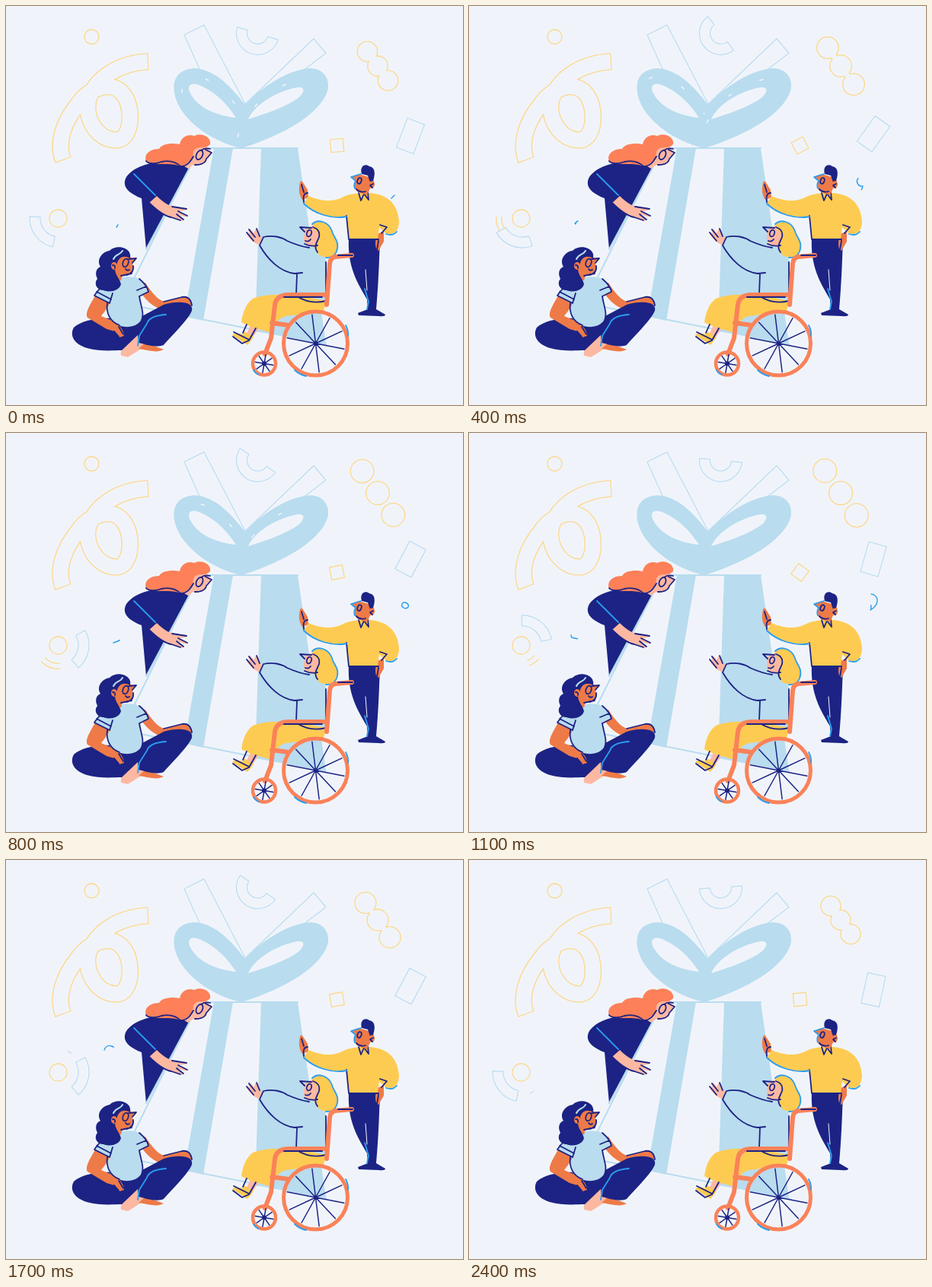
An HTML page that plays this animation: 600x525 px, repeating every 2.5 s.

```html
<!DOCTYPE html>
<html lang="en">
<head>
<meta charset="utf-8">
<title>Gift and friends</title>
<style>
html, body { margin: 0; width: 100%; height: 100%; overflow: hidden; background: #f0f4fa }
svg { display: block; width: 600px; height: 525px }
svg * { stroke-linecap: round; stroke-linejoin: round }
.sky { fill: #b9dcef }
.navy { fill: #1c2384 }
.sun { fill: #fecb52 }
.tan { fill: #ee7a48 }
.pink { fill: #fdb8a2 }
.hair { fill: #fd8058 }
.paper { fill: #f0f4fa }
.ink { fill: none; stroke: #1c2384; stroke-width: 1.8 }
.glow { fill: none; stroke: #2a9df0; stroke-width: 1.8 }
.chair { fill: none; stroke: #fa8259; stroke-width: 6 }
.edgeSky { fill: none; stroke: #b9dcef; stroke-width: 2 }
.thinSky { fill: none; stroke: #bcdcf2; stroke-width: 1.2 }
.thinSun { fill: none; stroke: #fdd78c; stroke-width: 1.3 }
.edge { fill: none; stroke: #fdd78c }
.core { fill: none; stroke: #f0f4fa }
.worm { fill: none; stroke: #2a9df0; stroke-width: 1.4 }
#sparks { fill: none; stroke: #f4f9fd; stroke-width: 1.4 }
#curl path { stroke-linecap: butt }
</style>
</head>
<body>
<svg viewBox="0 0 600 525">
  <!-- ribbon tails, box and bow -->
  <path class="thinSky" d="M255 85L234 38 260 25 314 129 404 43 420 62 386 88"/>
  <path class="sky" d="M273 187H298L259 414 234 408ZM335 187H383L420 444 327 428Z"/>
  <path class="edgeSky" d="M383 187H253L152 391 420 445"/>
  <path class="sky" d="M309 187C272 179 231 152 222 119C217 99 224 84 246 82C274 82 297 108 314 130C330 112 365 85 398 82C419 82 426 98 422 112C412 142 365 170 309 187Z"/>
  <path class="paper" d="M302 147C283 145 252 137 241 113C237 102 246 100 256 105C276 114 291 130 302 147ZM318 149C326 130 355 112 383 107C393 106 392 113 385 120C368 133 340 142 318 149Z"/>
  <g id="sparks">
    <path d="M231 114C230 91 246 90 260 95C282 105 297 121 309 142" stroke-dasharray="4 42"/>
    <path d="M304 172C320 130 348 105 393 95" stroke-dasharray="4 42"/>
  </g>

  <!-- confetti -->
  <circle class="thinSun" cx="112.500" cy="40.500" r="9.500"/>
  <circle class="thinSun" cx="68.500" cy="279.500" r="11.500"/>
  <g id="curl"></g>
  <g id="beads"><path class="edge"/><path class="edge" stroke-width="9"/><path class="core"/><path class="core" stroke-width="6.600"/></g>
  <path id="cup" class="thinSky" d="M-28 0A28 28 0 0 0 28 0H14A14 14 0 0 1-14 0Z"/>
  <path id="card" class="thinSky" d="M-12-20.500H12V20.500H-12Z"/>
  <path id="tile" class="thinSun" d="M-8.500-8.500H8.500V8.500H-8.500Z"/>
  <path id="fan" class="thinSky" d="M29.900-25.100A39 39 0 0 1 29.900 25.100L19.200 16.100A25 25 0 0 0 19.200-16.100Z"/>
  <path id="trail" class="thinSun"/>
  <path id="wisp" class="thinSky"/>
  <path id="wormA" class="worm" pathLength="100" d="M145 291L147 288C146 282 141 281 140 287C136 281 138 276 144 275L149 273C146 270 139 271 135 269C133 266 134 262 138 262C145 256 145 247 139 245C133 243 130 247 129 250"/>
  <path id="wormB" class="worm" pathLength="100" d="M506 253L510 249C514 245 516 241 517 237C510 238 507 229 512 226C520 222 531 222 528 229C525 233 518 229 520 225C523 219 531 226 527 233C540 225 536 216 533 214C528 210 523 214 526 209C536 203 532 192 526 196"/>

  <!-- leaning woman -->
  <path class="navy" d="M205 205C184 206 164 214 157 227C152 239 163 247 178 253L184 320 241 213 232 203Z"/>
  <path class="edgeSky" d="M241 213L184 320"/>
  <path class="pink" d="M237 188L262 183 269 194 263 199C263 207 255 211 246 209L239 214 228 207Z"/>
  <path class="hair" d="M184 205C180 194 190 188 201 188C205 181 218 180 228 182C230 172 239 168 247 171C256 166 270 172 268 182C261 190 250 182 246 192C246 202 238 208 229 211C217 205 198 211 184 205Z"/>
  <path class="ink" d="M184 204C187 208 197 208 204 205C214 203 223 205 229 211C238 211 242 205 246 198M262 189L270 193 264 200M263 201Q262 209 248 209M256 190Q261 186 268 188"/>
  <ellipse class="ink" cx="254" cy="196" rx="4" ry="6.500" transform="rotate(25 254 196)"/>
  <path class="pink" d="M188 259L198 250C207 259 215 264 223 264L236 266Q239 268 234 269L227 270 237 275Q239 278 234 277L225 274 233 281Q233 284 229 282L217 278C205 275 196 267 188 259Z"/>
  <path class="ink" d="M188 259C198 269 207 276 217 278L229 282M226 270L238 276M224 274L233 281M218 264L237 267"/>
  <path class="glow" d="M168 221C178 231 187 240 196 249"/>

  <!-- seated woman -->
  <path class="tan" d="M172 368L183 364C191 377 199 386 207 389L231 383C241 382 245 388 244 394L237 397 209 401C195 398 180 386 172 368Z"/>
  <path class="pink" d="M172 431L190 442C179 450 170 456 160 462L151 460C149 449 160 439 172 431Z"/>
  <path class="tan" d="M183 443L207 452C199 457 187 453 174 451Z"/>
  <path class="navy" d="M139 411C117 410 98 415 89 423C83 434 90 445 106 450C124 455 141 453 152 453L173 433 174 443C185 446 199 450 207 446C221 430 239 413 244 401C247 389 227 387 207 393L175 410Z"/>
  <path class="sky" d="M136 363C150 355 166 355 175 359C182 364 187 372 186 376L175 381C176 392 181 405 178 412C171 426 146 426 135 410L133 391 116 381C121 373 128 367 136 363Z"/>
  <path class="tan" d="M117 381L136 391C132 400 127 405 125 408L139 414C147 417 155 426 155 434L149 436 142 428 132 425 107 410C103 403 112 391 117 381Z"/>
  <path class="ink" d="M136 363C127 367 121 373 116 381L136 391 140 378M119 376L138 386M175 359C181 364 186 370 187 376L175 382M172 374L184 369M133 391C131 404 137 416 149 420M175 382C177 395 182 405 178 414M207 389L231 383Q242 381 244 394M142 428L148 435M148 422L154 432M230 391L238 397"/>
  <path class="tan" d="M145 331C150 325 160 326 164 331L171 333 166 338C168 348 163 354 153 354L151 361 141 362 136 346Z"/>
  <path class="navy" d="M163 332C153 326 146 332 145 343C139 349 150 359 151 366C148 376 135 377 128 374C119 374 115 365 120 359C116 351 119 345 124 343C118 333 127 323 136 322C143 315 157 316 162 324Q164 328 163 332Z"/>
  <path class="edgeSky" d="M141 333C144 326 150 328 153 322"/>
  <ellipse class="tan" cx="142" cy="342" rx="4" ry="5"/>
  <ellipse class="ink" cx="157" cy="338" rx="3.500" ry="5.500" transform="rotate(20 157 338)"/>
  <path class="ink" d="M161 333L171 332 166 338M162 347Q159 349 157 346M140 341Q144 341 143 345M167 342Q168 352 158 354M151 355L165 352"/>
  <path class="glow" d="M210 406C196 407 187 411 185 418L175 434 173 447"/>

  <!-- standing man -->
  <path class="navy" d="M450 305L491 306C490 335 489 366 486 399L498 406Q498 409 489 408L463 407 462 404 475 399 474 386C462 365 448 344 450 305Z"/>
  <path class="glow" d="M471 372L476 389 474 399"/>
  <path fill="none" stroke="#f0f4fa" d="M472 347L474 374"/>
  <path class="tan" d="M397 252L389 255C383 246 385 238 386 232Q388 228 391 234L396 242Z"/>
  <path class="tan" d="M486 301L496 296 496 310 489 322Q485 321 485 312Z"/>
  <path class="sun" d="M465 246C456 247 448 248 441 252C427 259 411 256 397 250L391 260C405 274 430 281 447 277L450 307H488L490 291 497 298C506 303 516 299 516 283C514 260 501 248 478 246Z"/>
  <path class="ink" d="M447 276L450 307H489M491 288L500 291 493 299M463 246L466 256 470 247 476 255 475 245M388 235L391 245M489 309L487 321M391 258Q389 246 396 246"/>
  <path class="glow" d="M391 260C405 274 430 281 447 277M499 300Q508 303 513 297"/>
  <path class="tan" d="M463 221L480 226C486 232 484 239 478 240L474 249 465 246C457 244 456 235 459 229L453 225Z"/>
  <path class="navy" d="M467 221C464 210 472 207 477 211C485 212 485 221 482 230L478 232 475 223Z"/>
  <ellipse class="tan" cx="480" cy="235" rx="4" ry="4.500"/>
  <ellipse class="ink" cx="464" cy="230" rx="2.500" ry="4" transform="rotate(20 464 230)"/>
  <path class="ink" d="M482 234L478 236 481 239M460 241Q465 246 472 244"/>
  <path class="glow" d="M466 221L453 225 459 230Q456 236 458 240"/>

  <!-- woman in wheelchair -->
  <path class="pink" d="M338 306L332 314C325 312 319 305 316 300Q316 296 320 300L318 294Q321 292 325 299L328 293Q331 293 333 302Z"/>
  <path class="ink" d="M316 298L325 309M319 294L327 304M329 293L333 303"/>
  <path class="sky" d="M337 304C350 301 361 304 368 308L395 311C409 318 421 328 421 340L420 390 382 385 383 352C361 350 345 335 333 314Z"/>
  <path class="ink" d="M333 315L338 304C350 301 362 304 369 309C378 313 391 317 398 318M333 315C344 334 360 350 379 352L389 351M382 353L381 379M420 337L420 387"/>
  <path class="pink" d="M324 413L316 431 323 437 337 417Z"/>
  <path class="sun" d="M311 427L325 436 317 446Q309 441 297 433Q300 429 311 432ZM324 385C348 376 381 380 420 388L417 402 368 408C355 411 354 421 345 429C332 425 316 421 309 416C311 401 316 391 324 385Z"/>
  <path class="ink" d="M316 419L311 430M328 424L319 440 310 444 298 435M299 429L319 439M382 382Q399 393 420 388M354 391L349 414"/>
  <path class="pink" d="M407 286L391 295 386 291 392 299C389 310 393 317 402 315L406 319 414 303Z"/>
  <path class="sun" d="M402 287C408 280 423 284 428 296C429 304 439 309 434 323C430 334 414 332 409 325C403 317 413 309 411 301C407 296 404 293 402 287Z"/>
  <ellipse class="ink" cx="398" cy="299" rx="3" ry="4.500" transform="rotate(20 398 299)"/>
  <path class="ink" d="M401 292L386 291 392 297M393 309Q397 311 400 307M392 313Q400 317 409 315M403 291Q413 294 411 304C409 310 403 316 409 324"/>
  <path class="glow" d="M402 287C409 280 423 283 428 296C429 304 439 309 434 323Q430 332 420 331"/>
  <path class="chair" d="M454 328L432 330Q426 331 425 339L421 393M421 380H374Q355 379 353 393L348 437 340 458M349 417L371 420"/>
  <path class="ink" d="M436 328H455M365 383L415 383"/>
  <circle class="chair" cx="406.500" cy="444" r="42" style="stroke-width:5"/>
  <circle class="chair" cx="339" cy="470.500" r="15" style="stroke-width:4.500"/>
  <path id="spokes" class="ink" style="stroke-width:1.500"/>
  <circle class="navy" cx="406.500" cy="444" r="2.500"/>
  <circle class="navy" cx="339" cy="470.500" r="3"/>
  <path class="glow" d="M379 479Q385 485 394 487M446 420Q450 428 449 434M325 479Q328 484 332 485"/>
</svg>
<script>
const LOOP = 2500, STEP = 100;
const $ = s => document.querySelector(s);
const set = (el, name, value) => el.setAttribute(name, value);
const show = (el, on) => el.style.display = on ? '' : 'none';
const polar = (x, y, r, deg) => {
  const a = deg * Math.PI / 180;
  return (x + r * Math.cos(a)).toFixed(2) + ' ' + (y + r * Math.sin(a)).toFixed(2);
};
// Runs 0 to 1 and back once per loop.
const wave = t => .5 - .5 * Math.cos(2 * Math.PI * t / LOOP);

const spokes = (x, y, r, n, turn) => Array.from({ length: n }, (_, i) =>
  `M${x} ${y}L${polar(x, y, r, turn + i * 360 / n)}`).join('');
set($('#spokes'), 'd', spokes(406.5, 444, 38, 10, 11) + spokes(339, 470.5, 12, 8, 10));

// A wide stroke with a narrower one on top leaves only the outline.
const curl = 'M187 73C150 75 118 93 108 124C103 150 122 179 148 176C166 172 168 130 152 114C138 98 108 108 94 130C76 152 66 180 75 203';
$('#curl').innerHTML = `<path class="edge" stroke-width="22.600" d="${curl}"/>
  <path class="core" stroke-width="20" pathLength="200" stroke-dasharray="198.800 9" stroke-dashoffset="-.6" d="${curl}"/>`;

const place = (id, x, y, turn) =>
  set($(id), 'transform', `translate(${x} ${y}) rotate(${turn})`);

const arc = (r, from, to) =>
  `M${polar(69, 279, r, from)}A${r} ${r} 0 0 0 ${polar(69, 279, r, to)}`;

// A short piece of line that crawls along its path and slips off the end.
function worm(id, t, arrival, length) {
  const el = $(id), head = 4 + 96 * (t / arrival) ** 1.3;
  const tail = Math.max(0, head - length * (.3 + .7 * t / arrival));
  show(el, tail < 99);
  set(el, 'stroke-dasharray', `${Math.min(head, 100) - tail} 300`);
  set(el, 'stroke-dashoffset', -tail);
}

function beads(t) {
  const spread = wave(t + 250), gap = 22 + 14 * spread, size = 26 + 5 * spread;
  const spots = [-1, 0, 1].map(k => [488 + k * gap * .58, 79 + k * gap * .82]);
  const dots = spots.map(p => `M${p}h.01`).join('');
  const neck = gap < 34.5 ? 'M' + spots.join('L') : '';
  const [edge, neckEdge, core, neckCore] = $('#beads').children;
  set(edge, 'd', dots);
  set(core, 'd', dots);
  set(edge, 'stroke-width', size + 1.3);
  set(core, 'stroke-width', size - 1.3);
  set(neckEdge, 'd', neck);
  set(neckCore, 'd', neck);
}

function frame(now) {
  const t = Math.floor(now % LOOP / STEP) * STEP;
  const there = wave(t), swing = there ** 1.25;
  const folded = Math.min(t, LOOP - t);
  const rock = Math.sin(Math.PI * (folded - 110) / 530) ** 2;

  place('#cup', 330.5, 36, -4 + 58 * rock);
  place('#card', 531, 166 + 5 * (1 - there) ** 3, 12 + 24 * rock);
  place('#tile', 434.5, 183.5, -5 - 145 * swing);
  place('#fan', 70, 279, 143 - 203 * swing);
  beads(t);
  worm('#wormA', t, 1700, 16);
  worm('#wormB', t, 1300, 28);

  // Yellow lines circle the ring first, a blue one follows later.
  const lead = 195 - .155 * (t - 100);
  const tail = lead + 50 * Math.sin(Math.PI * (t - 100) / 1250);
  const r = 27 - 7 * (t / 1300) ** 2;
  show($('#trail'), t > 100 && t < 1350);
  set($('#trail'), 'd', arc(r, tail, lead) + arc(r + 7, tail, lead));
  const turn = -61 + (t - 1700) * .177;
  show($('#wisp'), t >= 1600);
  set($('#wisp'), 'd', arc(30, turn + 5, turn - 5));

  show($('#sparks'), t < 900);
  set($('#sparks'), 'stroke-dashoffset', -t / 20);
  requestAnimationFrame(frame);
}
requestAnimationFrame(frame);
</script>
</body>
</html>
```
